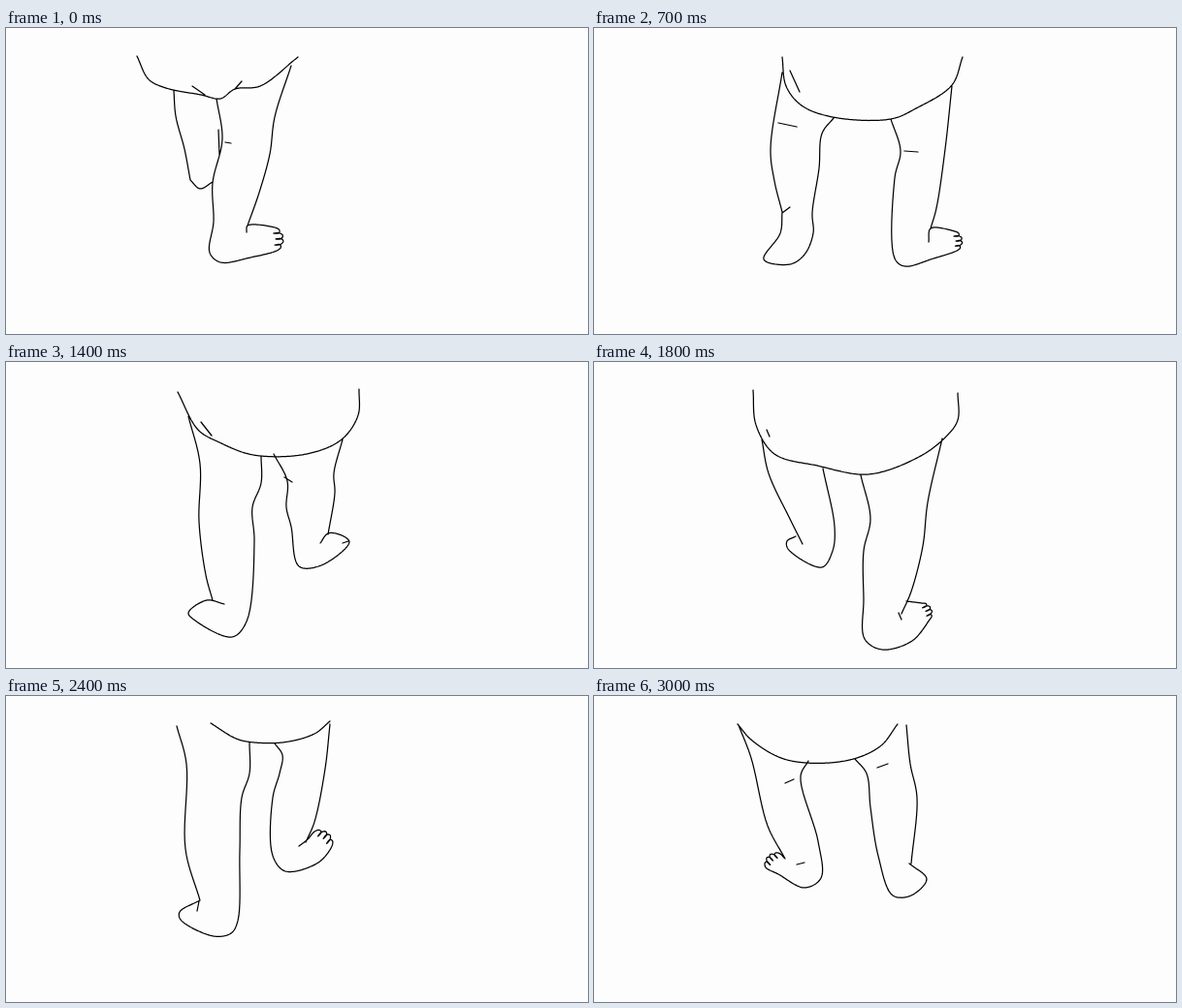
An HTML page with a canvas for the animation above (3.1 s loop, 600 by 316 pixels).

```html
<!DOCTYPE html>
<html lang="en">
<meta charset="utf-8">
<title>Walking legs</title>
<style>
  html, body { margin: 0; height: 100%; overflow: hidden; background: #fdfdfd; }
  canvas { display: block; }
</style>
<canvas id="stage" width="600" height="316"></canvas>
<script>
const ctx = document.getElementById('stage').getContext('2d');
const STEP = 100, STEPS = 31, SAMPLES = 260, TOES = 4, TOP = 28;

const lerp = (a, b, k) => a + (b - a) * k;
const between = (p, q, k) => [lerp(p[0], q[0], k), lerp(p[1], q[1], k)];
const dist = (a, b) => Math.hypot(b[0] - a[0], b[1] - a[1]);

// Bulging row of toes from a up to b, with a crease after each toe but the last
function toes(a, b, side) {
  const dx = side * (a[1] - b[1]), dy = side * (b[0] - a[0]);
  const edge = (u, out) => {
    const [x, y] = between(a, b, u), h = 0.24 * Math.sin(Math.PI * u) + out;
    return [x + dx * h, y + dy * h];
  };
  const row = [];
  for (let i = 1; i <= TOES; i++) {
    row.push(edge((i - 0.5) / TOES, 0.1));
    if (i < TOES) row.push(edge(i / TOES, 0), edge(i / TOES, -0.25), edge(i / TOES, 0));
  }
  return row;
}

// Reads "x,y" points; "~" stands for the toes
function parse(text, side) {
  const pts = text.split(' ').map(p => p === '~' ? p : p.split(',').map(Number));
  return pts.flatMap((p, i) => p === '~' ? toes(pts[i - 1], pts[i + 1], side) : [p]);
}

// Centripetal Catmull-Rom curve through the points
function smooth(pts) {
  const out = [pts[0]];
  for (let i = 0; i < pts.length - 1; i++) {
    const b = pts[i], c = pts[i + 1];
    const a = pts[i - 1] || between(b, c, -1), d = pts[i + 2] || between(c, b, -1);
    const [u, v, w] = [[a, b], [b, c], [c, d]].map(([p, q]) => Math.sqrt(dist(p, q)) || 1);
    for (let t = 0.1; t < 1.05; t += 0.1) {
      const s = 1 - t;
      out.push([0, 1].map(k => {
        const m = v * ((b[k] - a[k]) / u - (c[k] - a[k]) / (u + v)) + c[k] - b[k];
        const n = v * ((d[k] - c[k]) / w - (d[k] - b[k]) / (v + w)) + c[k] - b[k];
        return s * s * (1 + 2 * t) * b[k] + t * s * s * m + t * t * (3 - 2 * t) * c[k] - t * t * s * n;
      }));
    }
  }
  return out;
}

// Evenly spaced points, so that any two strokes can be blended
function resample(pts) {
  const at = [0];
  for (let i = 1; i < pts.length; i++) at.push(at[i - 1] + dist(pts[i - 1], pts[i]));
  let i = 1;
  return Array.from({ length: SAMPLES }, (_, n) => {
    const s = at[at.length - 1] * n / (SAMPLES - 1);
    while (i < pts.length - 1 && at[i] < s) i++;
    return between(pts[i - 1], pts[i], (s - at[i - 1]) / (at[i] - at[i - 1] || 1));
  });
}

// Legs run from hip to ankle; the inner line goes on around heel, sole and toes
function pose({ waist, left, right, marks }) {
  const curve = side => text => resample(smooth(parse(text, side)));
  return {
    strokes: [curve(1)(waist), ...left.map(curve(-1)), ...right.map(curve(1))],
    marks: marks.map(m => parse(m))
  };
}

const mix = (a, b, k) => ({
  strokes: a.strokes.map((s, i) => s.map((p, j) => between(p, b.strokes[i][j], k))),
  marks: []
});

// Moves a pose sideways and stretches it below the waist edge
function warp(p, dx, sy) {
  const bend = list => list.map(s => s.map(([x, y]) => [x + dx, TOP + (y - TOP) * sy]));
  return { strokes: bend(p.strokes), marks: bend(p.marks) };
}

const crossing = pose({
  waist: '135,29 147,53 165,62 201,69 221,73 236,63 262,60 301,30',
  left: ['173,65 175,91 184,125 190,157', '213,159 200,166 190,157'],
  right: ['294,39 277,92 272,130 261,170 249,204',
    '217,73 223,115 213,160 214,200 210,232 221,242 252,237 279,230 ~ 277,206 249,204 248,211'],
  marks: ['192,60 205,69', '236,63 243,55', '219,105 220,131', '226,118 232,119']
});

const landing = pose({
  waist: '194,30 198,60 214,80 246,92 306,94 332,83 369,59 380,30',
  left: ['194,46 182,125 186,158 194,190',
    '247,93 235,109 232,145 225,191 226,212 217,234 202,244 175,239 192,212 194,190'],
  right: ['369,60 362,125 353,186 347,207',
    '306,94 316,127 310,155 310,238 320,246 350,238 374,230 ~ 372,210 347,207 345,221'],
  marks: ['202,44 212,66', '190,98 209,102', '194,191 202,185', '320,127 334,128']
});

const rightDown = pose({
  waist: '184,31 198,66 230,79 284,84 305,71 338,58 356,31',
  left: ['198,66 202,130 212,168 222,186',
    '262,84 250,104 249,190 248,212 232,219 212,206 201,192 216,182'],
  right: ['351,43 346,110 347,165 343,200 332,237',
    '281,84 298,132 294,165 293,245 302,270 335,267 371,265 ~ 370,242 333,235'],
  marks: ['222,186 229,191', '221,186 217,192']
});

const leftDown = pose({
  waist: '177,31 198,70 220,83 255,96 310,95 346,80 363,55 364,28',
  left: ['188,56 200,105 199,165 206,220 213,246',
    '263,97 263,125 254,150 256,185 248,268 233,284 195,267 188,259 207,246 225,250'],
  right: ['347,80 338,115 339,135 332,178',
    '276,95 290,123 289,150 294,170 302,211 325,210 354,186 346,179 332,177 324,187'],
  marks: ['201,62 212,76', '287,119 295,124', '347,187 353,185']
});

const rightNear = pose({
  waist: '164,29 167,65 186,95 230,107 283,116 335,98 362,78 375,60 375,32',
  left: ['173,80 180,115 202,162 215,188',
    '236,110 248,170 246,195 235,212 200,193 199,185 208,180'],
  right: ['359,79 344,145 339,190 327,237 317,260',
    '275,117 285,162 278,195 278,245 279,286 297,297 328,288 346,266 ~ 338,249 322,247'],
  marks: ['178,70 181,77', '314,259 317,266']
});

const leftNear = pose({
  waist: '211,28 235,43 248,47 285,48 318,39 334,26',
  left: ['176,31 186,70 185,158 200,211',
    '251,48 251,80 243,105 241,160 239,232 232,245 214,248 180,231 179,223 200,211'],
  right: ['334,29 329,75 318,130 309,151',
    '277,49 285,61 282,80 275,105 275,165 288,181 322,172 336,155 ~ 318,140 311,148 302,155'],
  marks: ['199,212 197,222']
});

const apart = pose({
  waist: '148,29 163,46 199,66 259,67 295,52 313,29',
  left: ['149,30 162,64 179,134 197,168',
    '221,67 213,83 231,150 234,188 217,198 190,184 177,177 ~ 192,163 196,167'],
  right: ['322,30 326,70 333,105 327,173',
    '269,65 281,80 285,115 293,165 308,206 327,206 343,189 325,173'],
  marks: ['197,90 206,86', '209,174 217,172', '292,74 303,70']
});

// Step at which each pose is reached
const keys = [
  [0, crossing],
  [4, warp(leftDown, -10, 0.9)],
  [7, landing],
  [10, rightDown],
  [14, leftDown],
  [18, rightNear],
  [20, warp(mix(rightNear, leftNear, 0.3), 14, 1.12)],
  [24, leftNear],
  [27, warp(rightDown, -25, 0.91)],
  [30, apart]
];

function poseAt(step) {
  const i = Math.max(1, keys.findIndex(([at]) => at >= step));
  const [from, a] = keys[i - 1], [to, b] = keys[i];
  const now = mix(a, b, (step - from) / (to - from));
  if (step - from <= 1) now.marks = a.marks;
  if (to - step <= 1) now.marks = b.marks;
  return now;
}

function draw(time) {
  const { strokes, marks } = poseAt(Math.floor(time / STEP) % STEPS);
  ctx.fillStyle = '#fdfdfd';
  ctx.fillRect(0, 0, 600, 316);
  ctx.strokeStyle = '#000';
  ctx.lineWidth = 1.25;
  ctx.lineCap = ctx.lineJoin = 'round';
  ctx.beginPath();
  for (const line of [...strokes, ...marks]) {
    line.forEach(([x, y], i) => i ? ctx.lineTo(x, y) : ctx.moveTo(x, y));
  }
  ctx.stroke();
}

const start = performance.now();
function tick() {
  draw(performance.now() - start);
  requestAnimationFrame(tick);
}
tick();
</script>
</html>
```
